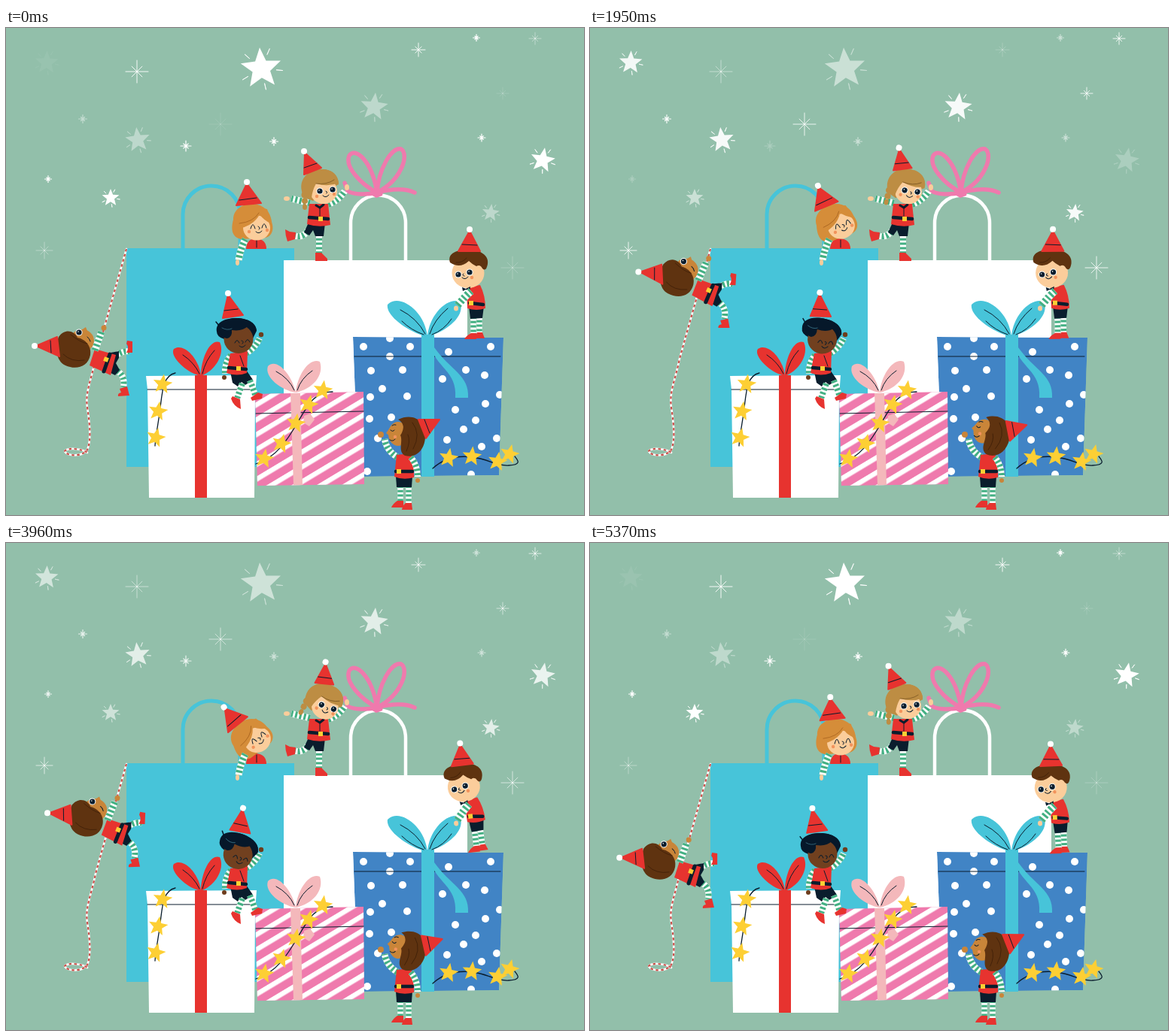
An HTML page that plays this animation: 768 by 648 pixels, repeating every 5400 ms.

```html
<!DOCTYPE html>
<html lang="en">
<head>
<meta charset="utf-8">
<title>Elves and presents</title>
<style>
html, body { margin: 0; width: 100%; height: 100%; overflow: hidden; background: #92bfaa; }
svg { display: block; width: 768px; height: 648px; }
</style>
</head>
<body>
<svg id="stage" viewBox="0 0 768 648" xmlns="http://www.w3.org/2000/svg"></svg>
<script>
const RED = '#e7332f', NAVY = '#0a1d2d', CYAN = '#47c4d9', PINK = '#ef7aad', BLUSH = '#f4b8bb',
  GOLD = '#fdcf34', GREEN = '#43b083', BROWN = '#5f3310', TAN = '#c98539', PEACH = '#fbcd9b';

const fill = (d, c, extra = '') => `<path d="${d}" fill="${c}" ${extra}/>`;
const line = (d, c = NAVY, w = 1, extra = '') =>
  `<path d="${d}" fill="none" stroke="${c}" stroke-width="${w}" stroke-linecap="round" stroke-linejoin="round" ${extra}/>`;
const dot = (x, y, r, c) => `<circle cx="${x}" cy="${y}" r="${r}" fill="${c}"/>`;
const oval = (x, y, rx, ry, c) => `<ellipse cx="${x}" cy="${y}" rx="${rx}" ry="${ry}" fill="${c}"/>`;
const group = (id, s) => `<g id="${id}">${s}</g>`;
const polar = (r, deg) => {
  const a = deg * Math.PI / 180;
  return (r * Math.sin(a)).toFixed(1) + ' ' + (-r * Math.cos(a)).toFixed(1);
};
const range = (n, f) => Array.from({ length: n }, (_, i) => f(i));

function starPath(r, turn) {
  return 'M' + range(10, i => polar(i % 2 ? r * .44 : r, turn + i * 36)).join('L') + 'Z';
}
const goldStar = (x, y, turn) => fill(starPath(13.5, turn), GOLD, `transform="translate(${x} ${y})"`);

// Striped sleeve or stocking
const limb = (d, w = 8) =>
  `<path d="${d}" fill="none" stroke="#fff" stroke-width="${w}"/>` +
  `<path d="${d}" fill="none" stroke="${GREEN}" stroke-width="${w}" stroke-dasharray="3 2.8"/>`;
const eye = (x, y) => dot(x, y, 4.6, '#fff') + dot(x, y, 3.6, NAVY) + dot(x - 1, y - 1, .8, '#fff');
const shutEye = (x, y, h = 8) => line(`M${x - 3} ${y + 3}q3 ${-h * 1.4} 6 0`, NAVY, 1);
const smile = (x, y) => line(`M${x - 4} ${y}q4 4 8 -1`, NAVY, 1);
const cheek = (x, y) => dot(x, y, 2.2, '#f2935c');
const buckle = (x, y, turn = 0) =>
  `<rect x="-3" y="-3" width="6" height="6" fill="${GOLD}" transform="translate(${x} ${y}) rotate(${turn})"/>`;
const hat = (tip, left, right, band) =>
  fill(`M${tip}L${left}L${right}Z`, RED, `stroke="${RED}" stroke-width="2" stroke-linejoin="round"`) + line(band);

// x, y, radius, turn, rhythm, lowest opacity
const stars = [
  [54, 46, 16, 2, 'rise', .06], [339, 54, 28, -4, 'dip', 0], [489, 105, 19, 6, 'rise', .4],
  [175, 149, 17, -6, 'rise', .4], [713, 176, 17, 10, 'early', 0], [139, 226, 12, 0, 'dip', 0],
  [644, 246, 12, 6, 'rise', .4]
];
const sparks = [
  [174, 58, 15, 'dip', 0], [548, 29, 9, 'early', 0], [625, 13, 4.5, 'dip', 0], [703, 14, 8, 'rise', .45],
  [660, 87, 8, 'rise', .15], [285, 128, 15, 'rise', .12], [102, 121, 5.5, 'rise', .45],
  [239, 157, 7, 'early', 0], [356, 151, 5.5, 'dip', 0], [632, 146, 5, 'dip', 0],
  [56, 201, 4.5, 'early', 0], [51, 296, 11, 'rise', .4], [673, 319, 15, 'rise', .25]
];

function sky() {
  const rays = r => range(10, i => {
    const a = i * 36 + (i % 2 ? -9 : 27);
    return `M${polar(r * .73, a)}L${polar(r * 1.02, a)}`;
  }).join('');
  const big = stars.map(([x, y, r, turn, beat, low]) =>
    `<g class="${beat}" data-low="${low}" transform="translate(${x} ${y})">` +
    fill(starPath(r, turn), '#fff') + line(rays(r), '#fff', .8, `transform="rotate(${turn})"`) + '</g>');
  const small = sparks.map(([x, y, r, beat, low]) =>
    `<g class="${beat}" data-low="${low}" transform="translate(${x} ${y})">` +
    line(range(8, i => `M0 0L${polar(i % 2 ? r * .65 : r, i * 45)}`).join(''), '#fff', r < 8 ? 1.2 : .9) + '</g>');
  return big.join('') + small.join('');
}

const cyanBag = () =>
  line('M235 293V248A38 38 0 0 1 311 248V293', CYAN, 5) + fill('M160 293H383V584H160Z', CYAN);

const whiteBag = () =>
  line('M458 309V259A36.5 36.5 0 0 1 531 259V309', '#fff', 4.5) + fill('M369 309H613V584H369Z', '#fff') +
  line('M493 219C470 207 450 184 456 170C464 158 486 176 493 219C495 188 512 158 525 161C536 168 526 202 493 219', PINK, 5.5) +
  line('M493 219C480 222 462 222 454 217L450 206M493 219C512 214 530 213 543 219', PINK, 5.5) +
  fill('M484 214L502 214L500 223L492 226L485 222Z', PINK);

const whiteBox = () =>
  fill('M186 463L333 462L331 490L330 625L190 625L188 481Z', '#fff') + line('M188 481H331') +
  fill('M251 462H267V625H251Z', RED) +
  fill('M259 463C238 458 217 436 223 427C236 418 257 440 259 463C259 440 271 413 284 418C291 432 280 455 259 463', RED) +
  line('M257 460Q250 445 235 435M261 460Q265 442 277 429') +
  line('M225 459C209 463 208 480 205 505S199 540 198 556', NAVY, 1.3) +
  goldStar(208, 474, 8) + goldStar(202, 510, 10) + goldStar(199, 545, 14);

const stripedBox = () =>
  fill('M331 487L475 484L476 607L334 609Z', PINK) + fill('M331 487L475 484L476 607L334 609Z', 'url(#stripes)') +
  line('M332 513L475 510') + fill('M378 486H391L394 608H382Z', BLUSH) +
  fill('M385 485C365 482 343 464 348 450C360 438 380 462 385 485C387 462 403 438 417 444C423 462 408 480 385 485', BLUSH) +
  line('M383 482Q376 466 359 457M387 482Q392 466 407 456') +
  fill('M396 516L404 513L410 521L403 530L395 525Z', BLUSH) +
  line('M332 580C360 571 374 548 388 524S410 484 434 484', NAVY, 1.3) +
  goldStar(343, 573, 10) + goldStar(366, 553, 14) + goldStar(385, 526, 10) + goldStar(402, 501, 14) + goldStar(421, 482, 8);

const spots = [
  [475, 424], [510, 413], [537, 424], [588, 431], [644, 424], [485, 456], [510, 437], [527, 455],
  [611, 455], [636, 462], [656, 488], [500, 480], [484, 491], [533, 490], [512, 518],
  [637, 500], [597, 508], [624, 522], [608, 534], [652, 546], [586, 548], [632, 557], [483, 520],
  [494, 546], [480, 590], [618, 594], [580, 467]
];
const blueBox = () =>
  `<g clip-path="url(#box)">${fill('M461 411L661 412L655 595L468 597Z', '#4184c5')}` +
  spots.map(([x, y]) => dot(x, y, 5, '#fff')).join('') + '</g>' +
  line('M463 437H657') + fill('M552 408H569V597H552Z', CYAN) +
  fill('M563 420C570 452 600 456 597 492L614 492C616 462 590 455 569 425Z', CYAN) +
  fill('M560 411C538 406 504 384 507 368C522 352 557 376 560 411C562 382 586 358 603 364C611 381 590 402 560 411', CYAN) +
  line('M557 407Q546 386 524 375M555 408Q538 402 526 390M563 407Q569 388 587 373M566 408Q582 402 592 387') +
  line('M567 586C580 574 597 568 620 571S650 583 668 582S680 575 676 570', NAVY, 1.3) +
  goldStar(588, 572, 10) + goldStar(619, 570, 6) + goldStar(653, 577, 10) + goldStar(669, 567, 14);

const rope = () => {
  const d = 'M160 294L131 397L119 440C113 470 105 484 108 505C112 530 113 550 108 561C102 571 80 570 78 563C83 557 104 561 108 565';
  return line(d, '#fff', 2.6) + `<path d="${d}" fill="none" stroke="#c9504a" stroke-width="2.2" stroke-dasharray="3.5 3.5"/>`;
};

const climber = () =>
  limb('M146 436Q157 428 165 431') + limb('M148 456Q159 464 156 478') +
  fill('M161 416L168 417L168 432L160 432Q164 425 160 420Z', RED) + fill('M151 480L161 477L164 489L149 490Q148 486 153 485Z', RED) +
  fill('M139 432L150 430L150 439L146 446L151 455L145 462L137 458Z', NAVY) +
  fill('M118 427L146 435L139 462L111 449Z', RED) + line('M138 434L130 457', NAVY, 5) + buckle(133, 441, 20) +
  oval(101, 416, 16, 15, TAN) + fill('M97 404L106 398L110 408Z', TAN) + eye(97, 405) + line('M108 411q3 2 4 6') +
  fill('M70 411C78 400 90 402 95 412C106 414 114 424 112 435C109 452 92 455 79 449C66 443 65 424 70 411', BROWN) +
  line('M76 434Q87 445 104 442M86 408Q98 418 108 420', '#3e1f08', .8) +
  hat('40 423', '68 411', '71 437', 'M59 416L60 432') + dot(38, 423, 4, '#fff') +
  limb('M118 429L127 404', 9) + dot(130, 399, 3.5, TAN);

const peeker = () =>
  fill('M319 294Q320 280 332 280Q346 281 346 294Z', RED) + line('M333 282V292') +
  group('peekHead',
    fill('M302 255C302 241 314 234 328 234C344 235 352 246 353 258C357 270 352 277 345 279L312 281C299 278 299 266 302 255', '#d58d39') +
    oval(333, 266, 18, 16.5, PEACH) +
    fill('M310 267Q330 262 337 248Q343 257 353 260L347 241L320 235L306 246Z', '#d58d39') +
    line('M310 260Q329 258 336 246', '#a8631f', .8) +
    shutEye(328, 264) + shutEye(343, 263) + line('M335 264q4 2 1 4') + smile(336, 271) + cheek(323, 271) + cheek(347, 269) +
    hat('320 207', '306 236', '339 233', 'M310 229L333 226') + dot(320, 205, 4, '#fff')) +
  limb('M318 281Q312 292 309 309', 9) + oval(307.5, 312, 2.5, 4, PEACH);

const dancer = () =>
  limb('M403 266Q396 281 382 276') + fill('M371 268L377 271L385 272L384 281L374 284Q371 276 371 268', RED) +
  limb('M416 274V301') + fill('M411 299H419L427 307V310H411Z', RED) +
  limb('M404 233L379 227', 8.5) + oval(373, 227, 4, 3, PEACH) +
  limb('M428 235Q443 229 450 217', 8.5) + oval(453, 212, 3, 4, PEACH) +
  fill('M402 259H424L422 277H411L408 269L403 276L396 272Z', NAVY) +
  fill('M403 234H428L431 262Q416 266 400 261Z', RED) + line('M403 252L428 254', NAVY, 4.5) + buckle(418, 254) +
  line('M412 236L417 239L422 235', NAVY, 3) + line('M417 239V250') +
  group('danceHead',
    dot(397, 222, 4.5, '#bd8d43') + oval(397, 230, 4, 4, '#bd8d43') + oval(397, 238, 3, 4, '#bd8d43') +
    fill('M393 217C389 200 403 188 418 188C434 187 442 197 442 208L424 218L408 230L395 225Z', '#bd8d43') +
    oval(422, 217, 18, 17, PEACH) +
    fill('M394 222Q392 204 404 194L424 188Q440 191 442 206Q428 212 412 207Q407 216 406 226Z', '#bd8d43') +
    line('M412 207Q426 209 436 202', '#7c5722', .8) +
    eye(417, 217) + eye(434, 215) + line('M425 217q3 1 1 3') + smile(425, 223) + cheek(413, 224) + cheek(436, 221) +
    hat('397 166', '396 195', '419 186', 'M396 186L413 180') + dot(396, 164, 4, '#fff'));

const sitter = () =>
  fill('M298 457L319 455L328 468L318 475L313 471L308 477L301 472Z', NAVY) +
  limb('M314 473Q310 484 307 493') + fill('M301 490L311 494L312 507Q302 503 299 493Z', RED) +
  limb('M324 469Q328 478 331 488') + fill('M325 492L335 485L341 487L340 493L327 496Z', RED) +
  limb('M299 435Q290 446 291 460') + dot(290, 465, 3, '#6d3d1d') +
  limb('M319 433Q331 426 337 413') + dot(339, 408, 3.2, '#6d3d1d') +
  fill('M298 433L321 430L320 459Q307 464 293 459Z', RED) + line('M296 452L319 454', NAVY, 4.5) + buckle(309, 453) +
  line('M311 436L316 450') +
  group('sitHead',
    fill('M280 404C278 392 290 386 306 386C323 386 333 394 333 403L328 413L290 414Q280 411 280 404', '#06182a') +
    oval(309, 414, 19.5, 19, '#71401f') +
    fill('M284 401Q287 414 294 413Q301 411 300 402Q314 404 321 397Q326 404 333 403Q331 387 306 386Q287 386 284 401', '#06182a') +
    line('M283 396L279 391', '#06182a', 1.5) + line('M287 399Q294 403 300 400', '#4a90a4', .6) +
    shutEye(307, 416, 5) + shutEye(321, 415, 5) + line('M313 416q4 1 1 4') + smile(314, 423) +
    hat('295 355', '288 386', '315 382', 'M290 376L308 374') + dot(295, 353, 4, '#fff'));

const tugger = () =>
  limb('M621 384V407', 7.5) + limb('M629 383V407', 7.5) +
  fill('M618 406H625V414H609Q612 409 618 406M626 405H633L636 413H623Z', RED) +
  fill('M615 370H635L633 386L617 387Z', NAVY) +
  fill('M612 345L630 342Q637 356 637 373Q625 377 613 373Z', RED) + line('M616 366L634 368', NAVY, 4.5) + buckle(618, 366) +
  oval(614, 326, 21.5, 20, PEACH) +
  fill('M590 312C586 299 600 295 614 295C631 295 642 303 640 314Q638 325 633 320Q630 314 625 317Q619 314 615 310Q603 321 590 312', BROWN) +
  line('M598 312Q606 313 612 306', '#3e1f08', .8) +
  eye(601, 328) + eye(616, 325) + line('M608 327q-3 2 1 3') + smile(610, 332) + cheek(619, 332) +
  fill('M606 345L611 347L617 344L616 351L611 348L607 350Z', NAVY) +
  hat('616 270', '601 297', '630 297', 'M606 288L626 289') + dot(616, 268, 4, '#fff') +
  limb('M618 350Q611 356 600 369', 10) + oval(598, 373, 3, 3.5, PEACH);

const reacher = () =>
  limb('M524 609V631', 7.5) + limb('M535 609V633', 7.5) +
  fill('M520 629H528V638H512Q514 633 520 629M531 632H539L540 641H526Q527 635 531 632', RED) +
  fill('M518 596H540L539 611H519Z', NAVY) +
  limb('M520 571Q506 563 503 547', 8.5) + oval(498, 541, 4, 4, TAN) +
  fill('M519 568L538 566Q543 582 542 598Q528 602 516 597Z', RED) + line('M518 590H540', NAVY, 4.5) + buckle(522, 590) +
  limb('M538 571Q547 582 547 597') + dot(547, 602, 3, TAN) +
  group('reachHead',
    oval(521, 540, 13, 16, TAN) + fill('M510 532L505 539L511 544Z', TAN) +
    line('M511 535q3 3 5 0M510 548q4 3 7 -1M513 529q2 -2 5 -1') + cheek(517, 544) +
    fill('M521 521C541 511 559 523 557 545C556 562 544 573 530 569C520 563 528 550 524 542Q533 528 521 521', BROWN) +
    line('M540 525Q552 540 541 560M534 541Q538 550 532 563', '#3e1f08', .8) +
    hat('576 521', '548 521', '558 546', 'M556 521L563 539'));

const stage = document.getElementById('stage');
stage.innerHTML = `<defs>
  <pattern id="stripes" width="20" height="17" patternUnits="userSpaceOnUse" patternTransform="translate(334 596) rotate(-31)">
    <rect width="20" height="6.5" fill="#fff"/></pattern>
  <clipPath id="box"><path d="M461 411L661 412L655 595L468 597Z"/></clipPath></defs>
  <rect width="768" height="648" fill="#92bfaa"/>` +
  sky() + cyanBag() + peeker() + whiteBag() + dancer() + blueBox() + whiteBox() + stripedBox() +
  sitter() + group('tugger', tugger()) + reacher() + rope() + group('climber', climber());

// Linear interpolation through time, value pairs
function track(t, ...keys) {
  for (let i = 2; i < keys.length; i += 2) {
    if (t <= keys[i]) {
      const k = (t - keys[i - 2]) / (keys[i] - keys[i - 2]);
      return keys[i - 1] + k * (keys[i + 1] - keys[i - 1]);
    }
  }
  return keys[keys.length - 1];
}
const pose = (id, transform) => document.getElementById(id).setAttribute('transform', transform);
const turn = (id, deg, x, y) => pose(id, `rotate(${deg} ${x} ${y})`);
const twinkles = [...stage.querySelectorAll('[data-low]')];

function draw(now) {
  const t = Math.floor(now / 30) * 30 % 5400, u = t % 2700;

  const beats = {
    rise: track(t, 0, 0, 2200, 1, 2850, 1, 5400, 0),
    dip: track(t, 0, 1, 700, 1, 2700, .22, 3200, .22, 5000, 1),
    early: track(t, 0, 1, 1900, .22, 4600, 1)
  };
  for (const el of twinkles) {
    const low = +el.dataset.low;
    el.setAttribute('opacity', low + (1 - low) * beats[el.getAttribute('class')]);
  }

  const climb = track(u, 0, 0, 2000, 1, 2700, 0);
  pose('climber', `translate(${27 * climb} ${-101 * climb}) rotate(${4 * climb} 38 423)`);
  turn('peekHead', track(u, 0, 0, 300, 0, 1270, -34, 2700, 0), 327, 262);
  turn('danceHead', track(u, 0, 0, 1200, 28, 2700, 0), 422, 221);
  turn('sitHead', track(u, 0, 0, 860, 24.5, 2700, 0), 306, 412);
  turn('reachHead', track(u, 0, 0, 1800, 13, 2700, 0), 540, 547);
  turn('tugger', track(t, 0, 0, 1000, -5.2, 1950, -.5, 2820, -5, 3600, -7.3, 4470, -6.4, 5370, -2.2, 5400, 0), 598, 372);
  requestAnimationFrame(draw);
}
requestAnimationFrame(draw);
</script>
</body>
</html>
```
